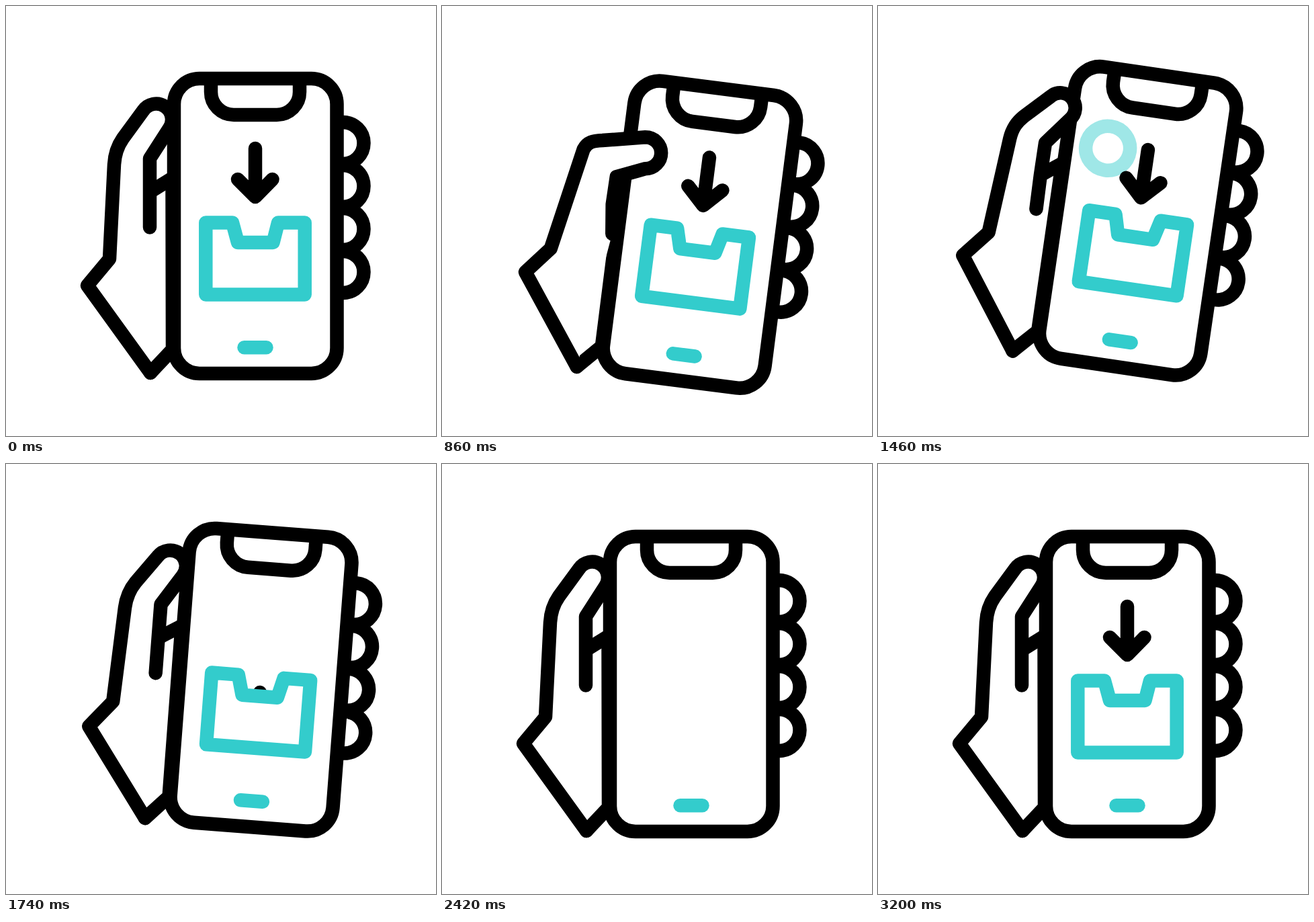
An HTML page for the animation above (3420 ms loop, 640x640 px).

```html
<!DOCTYPE html>
<html lang="en">
<head>
<meta charset="utf-8">
<title>Phone tap</title>
<style>
  html, body { margin: 0; width: 100%; height: 100%; overflow: hidden; background: #fff; }
  svg { display: block; width: 100vw; height: 100vh; }
  path, rect, circle { stroke-width: 20.5; stroke-linecap: round; stroke-linejoin: round; }
  .ink { stroke: #000; fill: #fff; }
  .line { stroke: #000; fill: none; }
  .teal { stroke: #33cccc; fill: none; }
</style>
</head>
<body>
<svg viewBox="0 0 640 640">
  <defs>
    <clipPath id="screen"><rect x="260" y="118" width="223" height="419"/></clipPath>
    <clipPath id="slot"><rect x="260" y="172" width="223" height="180"/></clipPath>
  </defs>
  <g id="scene">
    <g id="fingers"></g>
    <path class="line" d="M247.5 262 L248 511 L215 546"/>
    <path id="crease" class="line"/>
    <rect class="ink" x="250" y="108" width="242.5" height="439" rx="38"/>
    <circle id="ripple" class="teal" cx="311.5" cy="227"/>
    <g clip-path="url(#slot)">
      <path id="arrow" class="line" d="M371 212 V284 M345 258 L371 284 L396.5 258"/>
    </g>
    <g clip-path="url(#screen)">
      <path id="card" class="teal" d="M297.3 322.5 H337 L345 352 H397.5 L405 322.5 H444.7 V429.5 H297.3 Z"/>
    </g>
    <path class="line" style="stroke-linecap:butt" d="M305 108 V128 a34 34 0 0 0 34 34 H403 a34 34 0 0 0 34 -34 V108"/>
    <path class="teal" d="M354.5 508.3 H387.5"/>
    <path id="thumb" class="ink"/>
  </g>
</svg>
<script>
const LOOP = 3420, STEP = 20;
const CENTER = [371.25, 327.5];
const $ = id => document.getElementById(id);

$('fingers').innerHTML = [204, 268, 332, 396]
  .map(y => `<circle class="ink" cx="501.5" cy="${y}" r="31"/>`).join('');

// Eased progress from 0 to 1 between two times
const ease = (t, from, to) => {
  const p = Math.min(1, Math.max(0, (t - from) / (to - from)));
  return p * p * (3 - 2 * p);
};
const mix = (a, b, k) => a.map((v, i) => +(v + (b[i] - v) * k).toFixed(2));

// Thumb joints: raised and pressing
const joints = {
  base:  [[161, 236], [183.7, 223.6]],
  bend1: [[162, 218], [188, 212]],
  bend2: [[167, 207], [196, 209.5]],
  neck:  [[174, 197], [210, 207]],
  tipA:  [[204, 156], [272.7, 194.1]],
  tipB:  [[243, 182], [278.7, 240.7]],
  crook: [[214, 227], [237.6, 258]],
  mid:   [[214, 277], [236.8, 299.5]],
  end:   [[214, 329.5], [242, 343]],
  edge:  [[252, 253.5], [252, 266]]
};

function drawThumb(press) {
  const j = {};
  for (const name in joints) j[name] = mix(...joints[name], press);
  // Half the distance between the tip joints keeps the tip a full semicircle
  const r = Math.hypot(j.tipB[0] - j.tipA[0], j.tipB[1] - j.tipA[1]) / 2;
  $('thumb').setAttribute('d',
    `M215 546 L121 416 L154 376.5 L${j.base} C${j.bend1} ${j.bend2} ${j.neck} ` +
    `L${j.tipA} A${r} ${r} 0 0 1 ${j.tipB} L${j.crook} L${j.mid} L${j.end}`);
  $('crease').setAttribute('d', `M${j.mid} L${j.edge}`);
}

function draw(t) {
  const tilt = 10 * (ease(t, 200, 1200) - ease(t, 1200, 2200));
  const release = ease(t, 1000, 1630);
  const dip = 23 * (ease(t, 200, 580) - release);
  const x = CENTER[0] + 1.89 * tilt - 0.07 * dip;
  const y = CENTER[1] - 1.42 * tilt + dip;
  $('scene').setAttribute('transform',
    `translate(${x} ${y}) rotate(${tilt}) translate(${-CENTER[0]} ${-CENTER[1]})`);

  drawThumb(ease(t, 200, 545) - release);

  const grow = ease(t, 1060, 1300);
  $('ripple').setAttribute('r', 33 * grow);
  $('ripple').style.strokeWidth = 20.5 * grow;
  $('ripple').style.opacity = grow ? 1 - ease(t, 1300, 1608) : 0;

  const arrowY = t < 2300 ? 143 * ease(t, 1400, 1800) : -123 * (1 - ease(t, 2800, 3200));
  $('arrow').setAttribute('transform', `translate(0 ${arrowY})`);

  const cardX = t < 2300 ? -200 * ease(t, 1945, 2200) : 198 * (1 - ease(t, 2400, 2750));
  $('card').setAttribute('transform', `translate(${cardX} 0)`);
}

const start = performance.now();
function tick() {
  const t = (performance.now() - start) % LOOP;
  draw(Math.floor(t / STEP) * STEP);
  requestAnimationFrame(tick);
}
tick();
</script>
</body>
</html>
```
